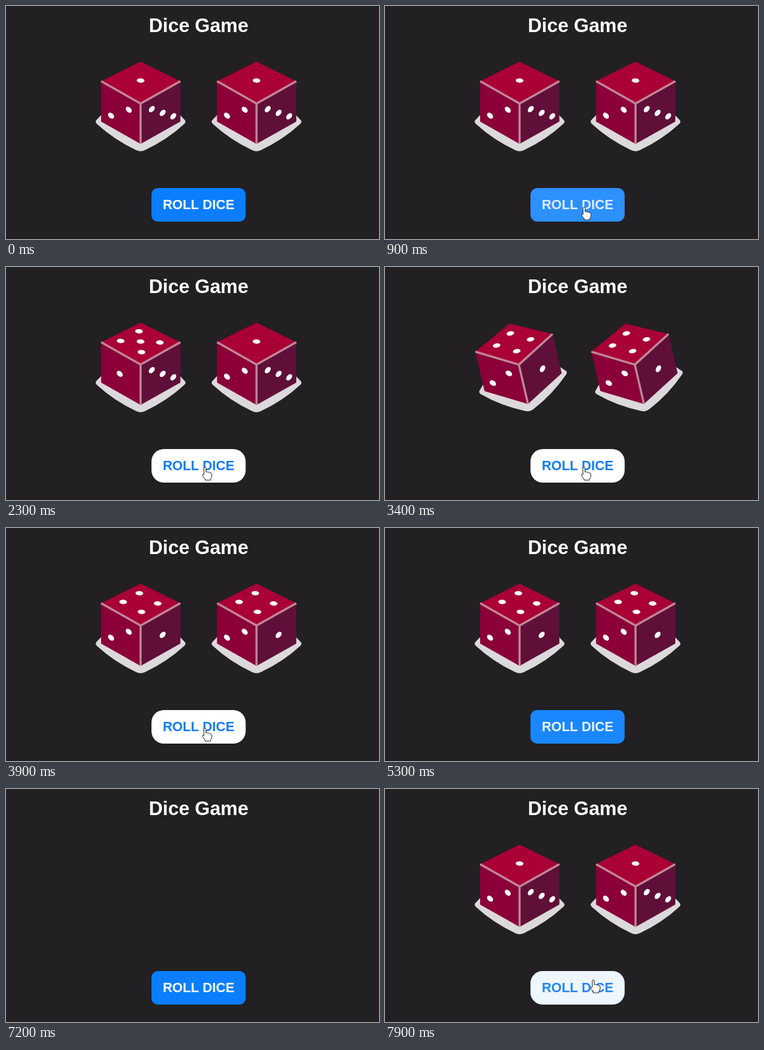
Animation, 600 px wide and 375 px high, one loop 8 s. Source, as an HTML page with a canvas:

```html
<!DOCTYPE html>
<html lang="en">
<head>
<meta charset="utf-8">
<title>Dice Game</title>
<style>
  html, body { margin: 0; width: 100%; height: 100%; overflow: hidden; background: #222022; }
  canvas { display: block; width: 600px; height: 375px; }
</style>
</head>
<body>
<canvas id="stage" width="600" height="375"></canvas>
<script>
const ctx = document.getElementById('stage').getContext('2d');
const LOOP = 8000, STEP = 100;
const FONT = '"Liberation Sans", Arial, sans-serif';
const BUTTON = { x: 234, y: 293, w: 151.5, h: 54 };
const FADE = 400;
const SWING = 15, SHAKE = 500, ROLL = 1000;

// Each roll: start time and the faces it lands on
const rolls = [
  { at: 1250, faces: [5, 1] },
  { at: 2828, faces: [4, 4] }
];
const reload = { gone: 7120, back: 7400 };
const hovers = [[850, 5030], [7630, LOOP + FADE]];

// Pointer paths: [start, end, from, to, easing power]
const moves = [
  [300, 1000, [336, 380], [320, 322], 2],
  [1000, 4900, [320, 322], [320, 322], 1],
  [4900, 5150, [320, 322], [334, 382], 1],
  [6200, 6400, [374, 354], [-44, -276], 1],
  [7300, 7900, [31, 20], [335, 307], 4],
  [7900, 8000, [335, 307], [335, 307], 1]
];

// Pip positions relative to the die's centre
const pips = {
  1: { top: [[0, -42]], left: [[-47.5, 14.5], [-19, 5]], right: [[18, 4], [35.5, 10], [52.5, 15.5]] },
  4: { top: [[-2, -57], [-28, -43], [27.5, -40.5], [1.5, -27]], left: [[-47.5, 14.5], [-19, 5]], right: [[35.5, 10]] },
  5: { top: [[-2.5, -58.5], [-32, -43], [0, -42], [31, -40.5], [1.5, -25]], left: [[-33.5, 10]], right: [[18, 4], [35.5, 10], [52.5, 15.5]] }
};

const clamp = v => Math.max(0, Math.min(1, v));
const mix = (a, b, k) => a + (b - a) * k;
const mixRgb = (a, b, k) => `rgb(${a.map((v, i) => Math.round(mix(v, b[i], k)))})`;

// cubic-bezier(.25, .1, .25, 1)
function ease(x) {
  let lo = 0, hi = 1;
  const curve = (a, b, s) => 3 * a * s * (1 - s) ** 2 + 3 * b * s * s * (1 - s) + s ** 3;
  for (let i = 0; i < 20; i++) {
    const mid = (lo + hi) / 2;
    if (curve(.25, .25, mid) < x) lo = mid; else hi = mid;
  }
  return curve(.1, 1, (lo + hi) / 2);
}

function shakeAngle(t) {
  const roll = rolls.find(r => t >= r.at && t < r.at + ROLL);
  if (!roll) return 0;
  const keys = [0, -SWING, 0, SWING, 0];
  const p = (t - roll.at) % SHAKE / SHAKE * 4;
  const i = Math.floor(p);
  return mix(keys[i], keys[i + 1], ease(p - i));
}

function facesAt(t) {
  if (t >= reload.gone) return t < reload.back ? [] : [1, 1];
  return rolls.reduce((faces, r) => t >= r.at ? r.faces : faces, [1, 1]);
}

function hoverAt(t) {
  for (const [on, off] of hovers) {
    if (t >= on && t < off) return ease(clamp((t - on) / FADE));
    if (t >= off && t < off + FADE) return 1 - ease((t - off) / FADE);
  }
  return 0;
}

function polygon(points, color) {
  ctx.beginPath();
  points.forEach(p => ctx.lineTo(...p));
  ctx.closePath();
  ctx.fillStyle = color;
  ctx.fill();
}

function dots(list, rx, ry, tilt) {
  ctx.fillStyle = '#fff';
  for (const [x, y] of list) {
    ctx.beginPath();
    ctx.ellipse(x, y, rx, ry, tilt, 0, Math.PI * 2);
    ctx.fill();
  }
}

function drawDie(x, face, angle) {
  const top = [0, -72.5], left = [-63.5, -41], mid = [0, -5], right = [64, -41];
  const lowLeft = [-63.5, 24], low = [0, 60], lowRight = [64, 24];
  ctx.save();
  ctx.translate(x, 162);
  ctx.rotate(angle * Math.PI / 180);

  ctx.beginPath();
  ctx.moveTo(-63, 13);
  ctx.lineTo(-71.5, 22);
  ctx.quadraticCurveTo(-73.5, 25, -70, 28);
  ctx.quadraticCurveTo(-43, 53, -7, 70);
  ctx.quadraticCurveTo(0, 73.5, 7, 70);
  ctx.quadraticCurveTo(43, 53, 70, 28);
  ctx.quadraticCurveTo(73.5, 25, 71.5, 22);
  ctx.lineTo(63, 13);
  ctx.fillStyle = '#dcd9dc';
  ctx.fill();

  polygon([top, right, mid, left], '#a90036');
  polygon([left, mid, low, lowLeft], '#8b0039');
  polygon([mid, right, lowRight, low], '#600f39');

  ctx.strokeStyle = '#c18797';
  ctx.lineWidth = 3.4;
  ctx.lineJoin = 'round';
  ctx.beginPath();
  ctx.moveTo(...left);
  ctx.lineTo(...mid);
  ctx.lineTo(...right);
  ctx.moveTo(...mid);
  ctx.lineTo(...low);
  ctx.stroke();

  const set = pips[face];
  dots(set.top, 6.2, 3.5, 0.05);
  dots(set.left, 5.7, 3.9, 0.8);
  dots(set.right, 5.9, 3.8, -0.85);
  ctx.restore();
}

function label(text, size, y, color) {
  ctx.font = `bold ${size}px ${FONT}`;
  ctx.textAlign = 'center';
  ctx.fillStyle = color;
  ctx.fillText(text, 309.8, y);
}

function drawButton(k) {
  const { x, y, w, h } = BUTTON;
  ctx.beginPath();
  ctx.roundRect(x, y, w, h, mix(10, 20, k));
  ctx.fillStyle = mixRgb([10, 126, 255], [255, 255, 255], k);
  ctx.fill();
  label('ROLL DICE', 21.4, 327, mixRgb([255, 255, 255], [18, 125, 240], k));
}

const hand = new Path2D('M-1.6 1.2Q0-.8 1.6 1.2V8Q3.4 6.6 4.8 8.4Q6.6 7.2 8 9.2Q10.4 8.6 11 11V15' +
  'Q10.6 17.6 9 19V21H.2V19Q-2.4 16.6-4 13.2Q-4.6 10.8-1.6 12Z');
const arrow = new Path2D('M0 0V16L3.8 12.6L6.4 18.4L8.8 17.4L6.2 11.6H11.4Z');

function drawPointer(t) {
  const move = moves.find(m => t >= m[0] && t < m[1]);
  if (!move) return;
  const [start, end, from, to, power] = move;
  const k = 1 - (1 - (t - start) / (end - start)) ** power;
  const x = mix(from[0], to[0], k), y = mix(from[1], to[1], k);
  const over = hovers.some(([on, off]) => t >= on && t < off);
  const shape = over ? hand : arrow;
  ctx.save();
  ctx.translate(x, y);
  ctx.fillStyle = '#fff';
  ctx.strokeStyle = '#222';
  ctx.lineWidth = 1;
  ctx.fill(shape);
  ctx.stroke(shape);
  ctx.restore();
}

function draw() {
  const t = Math.floor(performance.now() % LOOP / STEP) * STEP;
  ctx.fillStyle = '#222022';
  ctx.fillRect(0, 0, 600, 375);
  label('Dice Game', 31, 42, '#fff');
  const angle = shakeAngle(t);
  facesAt(t).forEach((face, i) => drawDie(216.5 + i * 186.5, face, angle));
  drawButton(hoverAt(t));
  drawPointer(t);
  requestAnimationFrame(draw);
}
draw();
</script>
</body>
</html>
```
